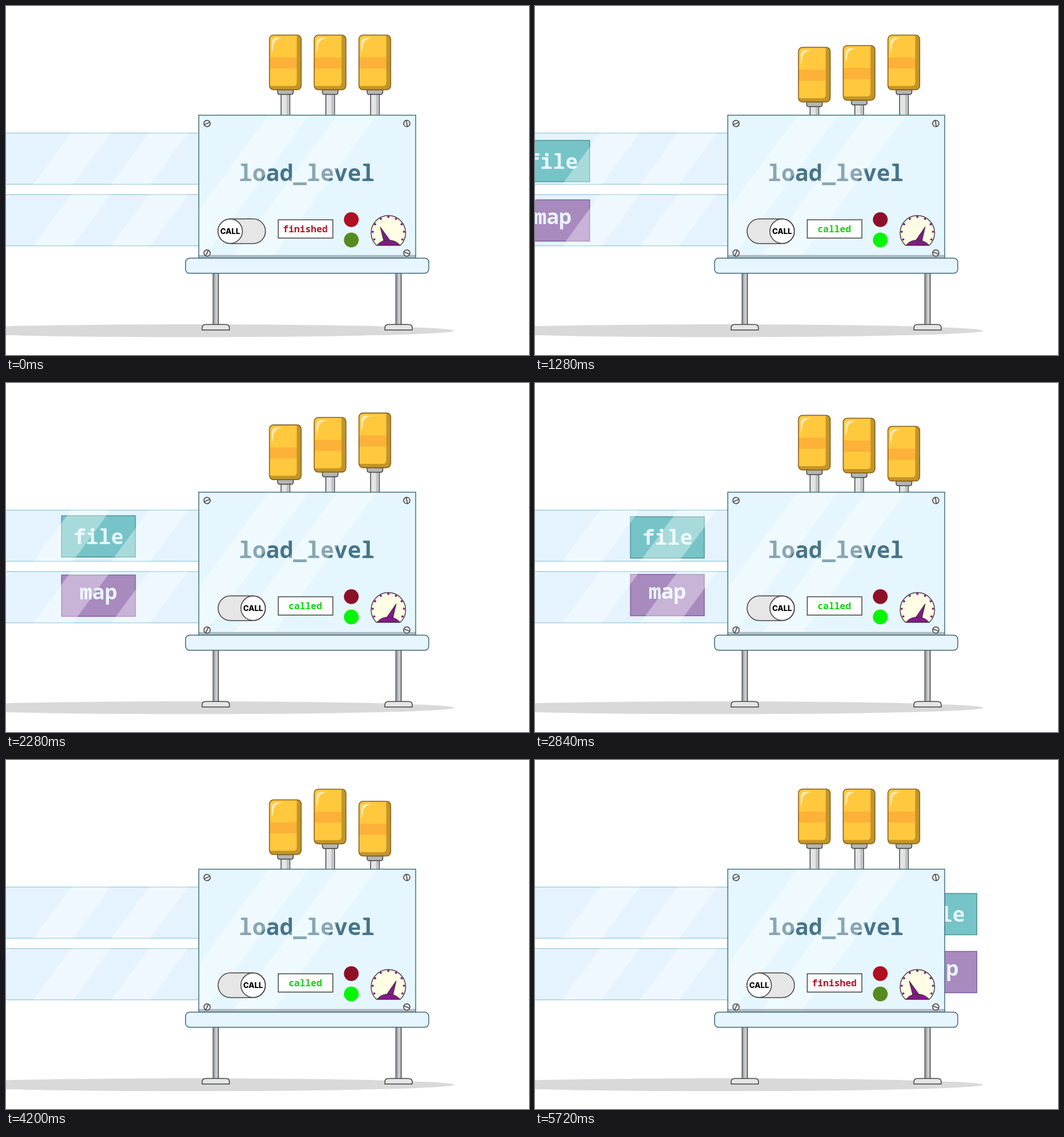
These frames come from a looping animation (900 px wide and 600 px high, 6360 ms). An HTML page:

```html
<!DOCTYPE html>
<html lang="en">
<head>
<meta charset="utf-8">
<title>load_level machine</title>
<style>
  html, body { margin: 0; width: 100%; height: 100%; overflow: hidden; background: #fff; }
  svg { display: block; width: 900px; height: 600px; }
  text { text-anchor: middle; font-weight: 700; font-family: "Noto Sans Mono", "DejaVu Sans Mono", monospace; }
  .ink { stroke: #444; stroke-width: 1.5; }
  .pipe { stroke: #9fcfe0; stroke-width: 1.5; }
  .shine { fill: #fff; opacity: .36; }
  .label { font-size: 36px; fill: #e6f5fa; }
</style>
</head>
<body>
<svg viewBox="0 0 900 600">
  <defs>
    <g id="piston">
      <rect class="ink" x="20" y="100" width="15" height="75" fill="#e3e5e5"/>
      <rect x="29.5" y="102" width="4.8" height="70" fill="#bfc3c5"/>
      <path class="ink" d="M14 94h27v4q0 4-4 4h-19q-4 0-4-4z" fill="#b4b6b7"/>
      <rect width="54.5" height="94" rx="7" fill="#ffc83d"/>
      <rect y="38.5" width="54.5" height="19" fill="#fcb138"/>
      <path d="M47 0h1q6.500 0 6.500 7v80q0 7-7 7H7q-6 0-7-6.500h41q6 0 6-6z" fill="#c39428"/>
      <path d="M4 30V13Q4 5 12 4.500H22Q8 8 7 18Q7 25 4 30z" fill="#ffe9b0"/>
      <rect width="54.5" height="94" rx="7" fill="none" stroke="#866018" stroke-width="1.6"/>
    </g>
    <g id="leg">
      <rect class="ink" x="19" y="458" width="9" height="90" fill="#c8ccce"/>
      <rect x="19.800" y="460" width="2.700" height="86" fill="#a1a6a9"/>
      <path class="ink" d="M0 557v-4q0-5.500 7-5.500h33q7 0 7 5.500v4z" fill="#e6e6e6"/>
    </g>
    <g id="screw">
      <circle class="ink" r="5.500" fill="#e9e9e9"/>
      <path class="ink" d="M-5 0H5"/>
    </g>
    <g id="pipeShine" class="shine">
      <path d="M112 0h68l-65 88h-68zM246 0h67l-65 88h-67z"/>
    </g>
  </defs>

  <ellipse cx="320" cy="558.300" rx="451" ry="11" fill="#d9d9d9"/>

  <g fill="#e5f3fe" class="pipe">
    <rect x="-5" y="218.500" width="340" height="88"/>
    <rect x="-5" y="324.300" width="340" height="88"/>
  </g>
  <g id="file">
    <rect width="127" height="71" fill="#76c4c8" stroke="#4a9699" stroke-width="1.500"/>
    <text class="label" x="63.500" y="48.500">file</text>
  </g>
  <g id="map">
    <rect width="127" height="71" fill="#a98abf" stroke="#80629f" stroke-width="1.500"/>
    <text class="label" x="63.500" y="41.500">map</text>
  </g>
  <use href="#pipeShine" y="218.500"/>
  <use href="#pipeShine" y="324.300"/>
  <path class="shine" d="M0 325h8l-8 11z"/>

  <g id="pistons"></g>

  <use href="#leg" x="337.500"/>
  <use href="#leg" x="652"/>
  <rect x="331.700" y="187.700" width="373.300" height="246" fill="#e6f6fe"/>
  <text x="517.500" y="301" font-size="39" fill="#477489">load_level</text>
  <path class="shine" d="M452 188h69L340 433h-8v-82zM570 188h68L457 433h-68z"/>
  <rect x="332" y="428" width="373" height="5.500" fill="#aebcc3"/>
  <rect x="331.700" y="187.700" width="373.300" height="246" fill="none" stroke="#446f80" stroke-width="1.500"/>
  <rect x="309" y="433.500" width="418.500" height="26" rx="7" fill="#e7f5fe" stroke="#3f6576" stroke-width="1.500"/>
  <use href="#screw" transform="translate(346 202) rotate(-25)"/>
  <use href="#screw" transform="translate(689.700 202) rotate(80)"/>
  <use href="#screw" transform="translate(346 424.700) rotate(-65)"/>
  <use href="#screw" transform="translate(689.700 424.700) rotate(20)"/>

  <rect class="ink" x="365" y="366" width="81.500" height="42.500" rx="21.200" fill="#e6e6e6"/>
  <g id="knob">
    <circle class="ink" cx="385.800" cy="387.200" r="21" fill="#fff"/>
    <text x="385.800" y="391.800" style="font:800 13px Inter,Arial,sans-serif">CALL</text>
  </g>

  <rect class="ink" x="468.500" y="367.500" width="94" height="31.500" fill="#fff"/>
  <text id="status" x="515" y="389" font-size="16"></text>

  <circle id="red" cx="594.200" cy="367.200" r="12.700"/>
  <circle id="green" cx="594.200" cy="402.300" r="12.700"/>

  <path class="ink" d="M637.500 411.500A29.700 29.700 0 1 1 678.500 411.500z" fill="#fffde3"/>
  <g id="ticks" fill="#86178b"></g>
  <path id="needle" d="M658 377L664 408H652z" fill="#86178b" stroke="#333"/>
  <path d="M638.500 411.300Q645 402.500 658 402.500T678 411.300z" fill="#86178b" stroke="#333"/>
</svg>

<script>
const LOOP = 6360, STEP = 40, END = 5720, SWITCH = 700, STROKE = 25;
const $ = id => document.getElementById(id);
const clamp = v => Math.max(0, Math.min(1, v));
const ease = u => (1 - Math.cos(Math.PI * clamp(u))) / 2;
const mix = (a, b, p) => `rgb(${a.map((v, i) => Math.round(v + (b[i] - v) * p))})`;
const wave = (t, peak) => Math.cos((t - peak) * 2 * Math.PI / 3000);
const move = (el, x, y) => el.setAttribute('transform', `translate(${x} ${y})`);

// Turning times of each piston: up, down, up, ...
const turns = [
  [600, 1158, 1625, 2178, 2640, 3283, 3870, 4369, 4880],
  [920, 1479, 2074, 2570, 3061, 3600, 4170, 4690, 5210],
  [1290, 1882, 2357, 2887, 3415, 4050, 4625, 5150, 5680]
];
$('pistons').innerHTML = turns.map(() => '<use href="#piston"/>').join('');
const pistons = [...$('pistons').children];

for (let k = -4; k <= 4; k++) {
  const a = k * 29 * Math.PI / 180;
  $('ticks').innerHTML += `<circle cx="${658 + 27 * Math.sin(a)}" cy="${389.5 - 27 * Math.cos(a)}" r="1.9"/>`;
}

function drop(times, t) {
  const i = times.findIndex(v => v > t);
  if (i < 1) return 0;
  const p = ease((t - times[i - 1]) / (times[i] - times[i - 1]));
  return STROKE * (i % 2 ? p : 1 - p);
}

function draw(t) {
  pistons.forEach((el, i) => move(el, 453.4 + 77 * i, 50 + drop(turns[i], t)));

  const u = (t - 2500) / 1000;
  const x = 122.6 + 122.3 * u + 3.5 * u ** 3;
  move($('file'), x, 230.4 + 2.2 * wave(t, 3682));
  move($('map'), x, 331.2 + 2.1 * wave(t, 1280));

  const on = ease(Math.min(t, END - t) / SWITCH);
  const called = on > .5;
  move($('knob'), 39.4 * on, 0);
  $('needle').setAttribute('transform', `rotate(${49 * on - 25} 658 410)`);
  $('status').textContent = called ? 'called' : 'finished';
  $('status').setAttribute('fill', called ? '#12d312' : '#b5122b');
  $('red').setAttribute('fill', mix([176, 16, 34], [142, 16, 40], on));
  $('green').setAttribute('fill', mix([85, 139, 31], [6, 245, 6], on));
}

const start = performance.now();
function tick() {
  const t = (performance.now() - start) % LOOP;
  draw(Math.floor(t / STEP) * STEP);
  requestAnimationFrame(tick);
}
tick();
</script>
</body>
</html>
```
